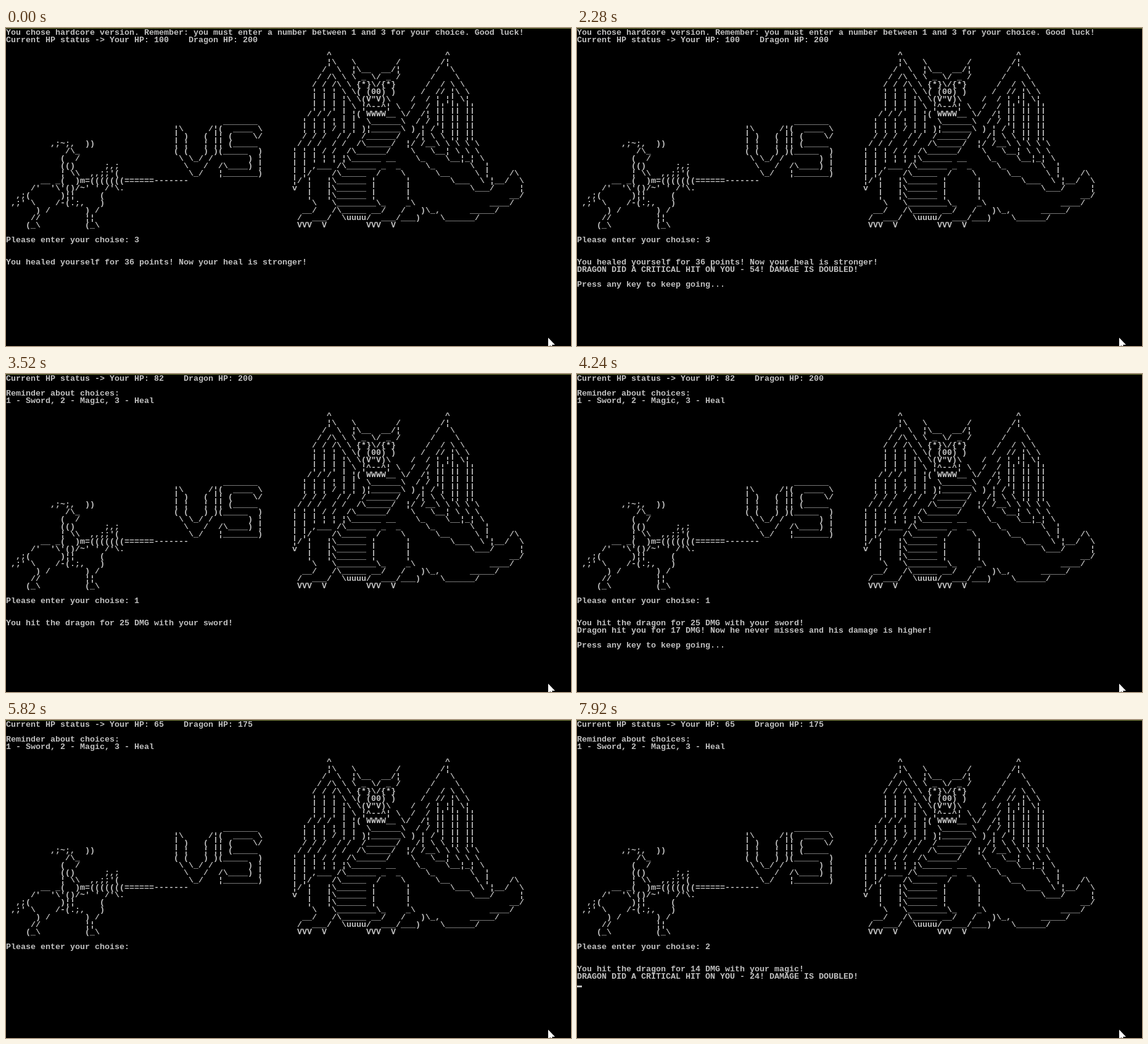
An HTML page that plays this animation: 916x515 px, repeating every 8000 ms.

```html
<!DOCTYPE html>
<html lang="en">
<head>
<meta charset="utf-8">
<title>Knight versus dragon</title>
<style>
  html, body { margin: 0; width: 100%; height: 100%; overflow: hidden; background: #000; }
  #stage { position: absolute; left: 0; top: 0; width: 916px; height: 515px; overflow: hidden; background: #000; }
  #edge { position: absolute; left: 0; top: 0; width: 916px; height: 1px; background: #76803a; }
  pre {
    position: absolute; left: 0; top: 2px; margin: 0; color: #c0c0c0;
    font: bold 13.33px/12px "Liberation Mono", "Courier New", monospace;
    font-variant-ligatures: none;
  }
  pre i { font-style: normal; font-weight: normal; }
  #caret { position: absolute; width: 8px; height: 3px; background: #c0c0c0; }
  #mouse { position: absolute; left: 878px; top: 501px; }
</style>
</head>
<body>
<div id="stage">
  <div id="art"></div>
  <pre id="text"></pre>
  <div id="caret"></div>
  <div id="edge"></div>
  <svg id="mouse" width="14" height="20"><path d="M1 .5V16L4.5 12.8 7 18.5 9.5 17.5 7 12H12Z" fill="#fff"/></svg>
</div>
<script>
const CELL_W = 8, CELL_H = 12, TOP = 1, LOOP = 8000;
const $ = id => document.getElementById(id);

const knight = String.raw`
         ,;~;,  ))
            /\_
           (  /
           (()      ;,;
           | \\  ,,;;'(
       __ _(  )m=(((((((======-------
     /'  '\'()/~' ' /'\.
  ,;(      )||     (
 ,;' \    /-(.;,   )
      ) /       ) /
     //         ||
    (_\         (_\ `;

const versus = String.raw`
          _______
|\     /|(  ____ \
| )   ( || (    \/
| |   | || (_____
( (   ) )(_____  )
 \ \_/ /       ) |
  \   /  /\____) |
   \_/   |_______)`;

const dragon = String.raw`
       ^                       ^
       |\   \        /        /|
      /  \  |\__  __/|       /  \
     / /\ \ \ _ \/ _ /      /    \
    / / /\ \ {*}\/{*}      /  / \ \
    | | | \ \( (00) )     /  // |\ \
    | | | |\ \(V"V)\    /  / | || \|
    | | | | \ |^--^| \  /  / || || ||
   / / /  | |( WWWW__ \/  /| || || ||
  | | | | | |  \______\  / / || || ||
  | | | / | | )|______\ ) | / | || ||
  / / /  / /  /______/   /| \ \ || ||
 / / /  / /  /\_____/  |/ /__\ \ \ \ \
| | | / /  /\______/    \   \__| \ \ \
| | | | | |\______ __    \_    \__|_| \
| | ,___ /\______ _  _     \_       \  |
| |/    /\_____  /    \      \__     \ |    /\
|/ |   |\______ |      |        \___  \ |__/  \
v  |   |\______ |      |            \___/     |
   |   |\______ |      |                    __/
    \   \________\_    _\               ____/
  __/   /\_____ __/   /   )\_,      _____/
 /  ___/  \uuuu/  ___/___)    \______/
 VVV  V        VVV  V`;

function addArt(source, col, row) {
  const pre = document.createElement("pre");
  pre.innerHTML = source.slice(1).replace(/\|/g, "\u00a6").replace(/_+/g, "<i>$&</i>");
  pre.style.marginLeft = col * CELL_W + "px";
  pre.style.marginTop = row * CELL_H + "px";
  $("art").append(pre);
}
addArt(knight, 0, 15);
addArt(versus, 34, 12);
addArt(dragon, 58, 3);

const status = (you, foe) => `Current HP status -> Your HP: ${you}    Dragon HP: ${foe}`;
const choices = ["", "Reminder about choices:", "1 - Sword, 2 - Magic, 3 - Heal"];
const intro = ["You chose hardcore version. Remember: you must enter a number between 1 and 3 for your choice. Good luck!", status(100, 200)];
const second = [status(82, 200), ...choices];
const third = [status(65, 175), ...choices];

const ask = key => ["Please enter your choise: " + key];
const critical = n => `DRAGON DID A CRITICAL HIT ON YOU - ${n}! DAMAGE IS DOUBLED!`;
const pause = ["", "Press any key to keep going..."];
const heal = [...ask(3), "", "", "You healed yourself for 36 points! Now your heal is stronger!"];
const healHit = [...heal, critical(54)];
const sword = [...ask(1), "", "", "You hit the dragon for 25 DMG with your sword!"];
const swordHit = [...sword, "Dragon hit you for 17 DMG! Now he never misses and his damage is higher!", ...pause];
const magic = [...ask(2), "", "", "You hit the dragon for 14 DMG with your magic!"];
const magicHit = [...magic, critical(24)];

// start time, header, art shift in rows, log below the art, caret [column, row]
const steps = [
  [0, intro, 0, heal],
  [280, intro, 0, healHit],
  [1030, intro, 0, healHit, [0, 33]],
  [1610, intro, 0, healHit],
  [2010, intro, 0, healHit, [0, 33]],
  [2280, intro, 0, [...healHit, ...pause]],
  [2840, second, 2, ask("")],
  [3400, second, 2, ask(1), [27, 30]],
  [3520, second, 2, sword],
  [4240, second, 2, swordHit],
  [5260, second, 2, swordHit, [30, 36]],
  [5820, third, 2, ask("")],
  [6220, third, 2, ask(2), [27, 30]],
  [6370, third, 2, magic],
  [7080, third, 2, magicHit],
  [7920, third, 2, magicHit, [0, 35]],
];

function show([, header, shift, log, caret]) {
  const gap = Array(28 + shift - header.length).fill("");
  $("text").textContent = [...header, ...gap, ...log].join("\n");
  $("art").style.transform = `translateY(${shift * CELL_H}px)`;
  $("caret").hidden = !caret;
  if (caret) {
    $("caret").style.left = caret[0] * CELL_W + "px";
    $("caret").style.top = TOP + (caret[1] + 1) * CELL_H - 3 + "px";
  }
}

let current;
const start = performance.now();
function tick() {
  const t = (performance.now() - start) % LOOP;
  const step = steps.findLast(s => s[0] <= t);
  if (step !== current) show(current = step);
  requestAnimationFrame(tick);
}
tick();
</script>
</body>
</html>
```
